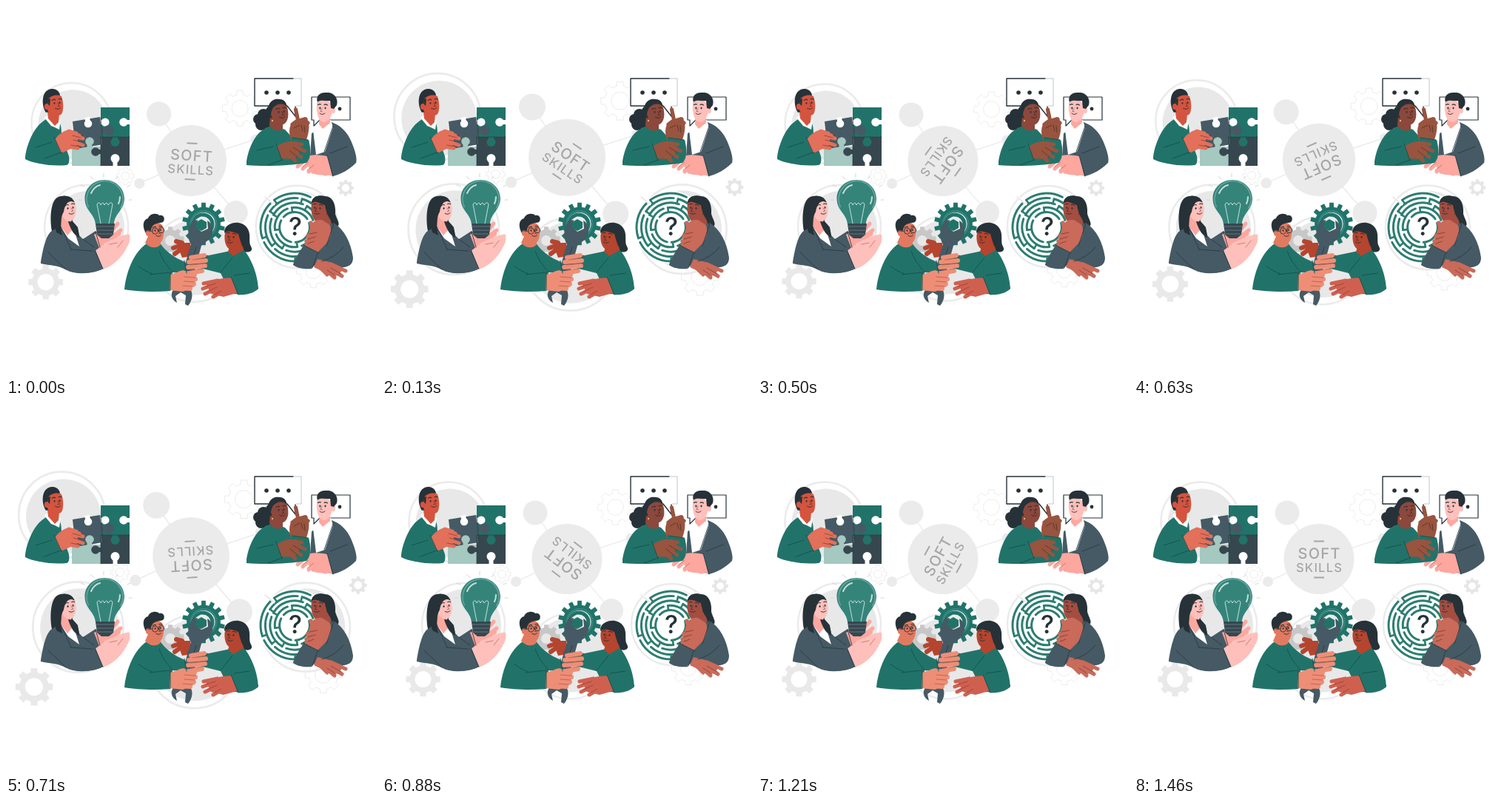
These frames come from a looping animation (500 px wide and 500 px high, 1.5 s). An HTML page with a canvas:

```html
<!DOCTYPE html>
<html lang="en">
<head>
<meta charset="utf-8">
<title>Soft skills</title>
<style>
html, body { margin: 0; width: 100%; height: 100%; overflow: hidden; background: #fff; }
canvas { display: block; width: 500px; height: 500px; }
</style>
</head>
<body>
<canvas id="stage" width="500" height="500"></canvas>
<script>
const ctx = document.getElementById('stage').getContext('2d');
const TAU = Math.PI * 2;
const GREEN = '#21736a', DEEP_GREEN = '#174f49', SLATE = '#455a64', DEEP_SLATE = '#37474f',
  INK = '#263238', MINT = '#a5c8c1', PALE = '#ebebeb';
const ROSE = '#ffc0bb', PINK = '#fda79f', RUST = '#d4543f', CORAL = '#e2705a', AMBER = '#e27a60',
  PEACH = '#ee8e77', BROWN = '#8c483c', UMBER = '#98543f', CLAY = '#b5452f', BRICK = '#cf6050',
  SIENNA = '#a44d41', SALMON = '#c96a5a';

function fill(color, d) {
  ctx.fillStyle = color;
  ctx.fill(new Path2D(d));
}
function line(color, width, d) {
  ctx.strokeStyle = color;
  ctx.lineWidth = width;
  ctx.stroke(new Path2D(d));
}
function disc(color, x, y, r, ry = r) {
  ctx.fillStyle = color;
  ctx.beginPath();
  ctx.ellipse(x, y, r, ry, 0, 0, TAU);
  ctx.fill();
}
function ring(color, width, x, y, r, from = 0, to = TAU) {
  ctx.strokeStyle = color;
  ctx.lineWidth = width;
  ctx.beginPath();
  ctx.arc(x, y, r, from, to);
  ctx.stroke();
}
function gear(x, y, r, teeth, hole, color, outlined) {
  const step = TAU / teeth, root = r * 0.79;
  ctx.beginPath();
  for (let i = 0; i < teeth; i++) {
    const a = i * step - Math.PI / 2;
    for (const [f, q] of [[-0.29, root], [-0.22, r], [0.22, r], [0.29, root]])
      ctx.lineTo(x + q * Math.cos(a + f * step), y + q * Math.sin(a + f * step));
  }
  ctx.closePath();
  ctx.moveTo(x + hole, y);
  ctx.arc(x, y, hole, 0, TAU);
  if (outlined) {
    ctx.strokeStyle = color;
    ctx.lineWidth = 0.9;
    ctx.stroke();
  } else {
    ctx.fillStyle = color;
    ctx.fill('evenodd');
  }
}
// Eyes, brows, nose and smile; dir is the side the head looks to.
function face(x, y, dir, tilt = 0) {
  ctx.save();
  ctx.translate(x, y);
  ctx.rotate(tilt);
  ctx.scale(dir, 1);
  disc(INK, -3.5, 0, 1, 1.4);
  disc(INK, 3.6, 0, 1, 1.4);
  line(INK, 1.1, 'M-6.5 -4Q-4 -6 -2 -4.5M2.5 -5Q4.5 -6 6.5 -4.5');
  line('#0007', 0.8, 'M1 0L3 4.5L0.5 4.8');
  line(INK, 0.9, 'M-3 7Q1 10 4 7');
  ctx.restore();
}

function backdrop() {
  line('#e4e4e4', 1, 'M250 209L207 147M250 209L181 240M250 209L310 279M250 209L336 181');
  for (const [x, y, r] of [[250, 209.5, 47.5], [207, 147, 16.5], [181, 240, 7], [310, 279, 16], [336, 181, 6.5]])
    disc(PALE, x, y, r);
  for (const [x, y, r, dx, dy] of [[90, 159, 53.5, 2, 2], [110, 298, 56, 2, 1], [254, 341, 57.5, 1, -2], [392, 298, 55, 1, 0]]) {
    disc('#fff', x, y, r);
    ring(PALE, 2.5, x, y, r);
    disc('#e8e8e8', x + dx, y + dy, r - 7);
  }
  gear(55.5, 372, 23.5, 8, 11, '#e9e9e9');
  gear(457, 246, 11, 8, 5, '#e6e6e6');
  gear(315.5, 139.5, 24, 8, 11, PALE, true);
  gear(162, 230, 12, 8, 5.5, PALE, true);
  gear(414, 357, 23, 8, 10.5, PALE, true);
}

function title(angle) {
  ctx.save();
  ctx.translate(250, 210);
  ctx.rotate(angle);
  ctx.fillStyle = '#a6a6a6';
  ctx.textAlign = 'center';
  ctx.letterSpacing = '1.2px';
  ctx.font = '500 20px Inter, sans-serif';
  ctx.fillText('SOFT', 0.5, -1);
  ctx.font = '500 16.5px Inter, sans-serif';
  ctx.fillText('SKILLS', 0.5, 17);
  ctx.fillRect(-7, -25.5, 14, 2);
  ctx.fillRect(-7, 23.5, 14, 2);
  ctx.restore();
}

function puzzle() {
  fill(MINT, 'M89 190H128V216H89Z');
  fill(GREEN, 'M128 137H167V177H128Z');
  fill(DEEP_SLATE, 'M128 177H167V216H128Z');
  disc(GREEN, 147.5, 184, 6);
  fill(GREEN, 'M144 176H151V182H144Z');
  disc('#fff', 134, 157, 5.5);
  fill('#fff', 'M127 154H133V160H127Z');
  disc('#fff', 159, 157, 5.8);
  fill('#fff', 'M160 154H168V160H160Z');
  disc('#fff', 147.5, 206, 6);
  fill('#fff', 'M144.5 207H150.5V217H144.5Z');
  disc(DEEP_SLATE, 121, 197, 5.8);
  fill(DEEP_SLATE, 'M121 194H129V200H121Z');
  fill(SLATE, 'M90 156L127 150L131 187L94 193Z');
  disc(SLATE, 139, 168, 7);
  fill(SLATE, 'M127 165L138 164V172H128Z');
  disc('#fff', 111, 159, 5.3);
  fill('#fff', 'M106 151L113 150L114 157L108 158Z');
  disc(MINT, 113, 183, 5.8);
  fill(MINT, 'M109.5 184H116V194H109.5Z');
  line('#2a3a42', 0.7, 'M128 151L131 187M128 177H167M128 177V216');
}

function puzzleMan() {
  fill(GREEN, 'M26 207C26 194 34 174 41 165C45 159 51 155 57 151L72 157C76 163 74 172 76 178L85 203C86 210 85 214 82 215C62 217 37 213 26 207Z');
  fill('#fff', 'M52 151L57 147L69 156L74 153L72 167L66 164L61 162Z');
  fill(RUST, 'M55 134L72 144L71 157L66 162L57 152Z');
  fill(INK, 'M54 144C48 135 48 119 56 114C62 110 71 112 73 120L70 126L58 143Z');
  fill(RUST, 'M57 127C59 121 69 119 75 122C78 131 78 141 75 146C69 151 60 147 56 141Z');
  disc(RUST, 55, 136, 3.2, 4);
  fill(INK, 'M57 126L60 125L59 135L57 133Z');
  face(69, 131, 1, -0.08);
  fill(CORAL, 'M65 181C72 173 78 168 86 167L97 170L97 188L77 198L70 196Z');
  line(CORAL, 5, 'M85 169L99 175M88 175L104 179M86 182L104 188M84 190L97 192');
  line('#8e3e31', 0.8, 'M90 175L101 178M91 181L103 184M88 188L99 190');
  fill(GREEN, 'M37 187L65 178L74 198L49 206Z');
  line(DEEP_GREEN, 0.9, 'M65 177L75 199M74 198L52 206M40 191L62 184');
}

function bubbles() {
  fill('#fff', 'M336 98H399V135H392L391 149L380 135H336Z');
  line(INK, 1.4, 'M388 98H336V135H380L391 149V136');
  line('#9aa3a7', 0.6, 'M388 98H399V135H392');
  const small = 'M413 123H465V154H424L416 162V154H413Z';
  fill('#fff', small);
  line(INK, 1.2, small);
  for (const x of [352, 367, 382]) disc(INK, x, 117, 2.8);
  for (const x of [437, 451]) disc(INK, x, 139, 2.4);
}

function talkers() {
  fill(SLATE, 'M413 172L440 157C451 161 461 169 467 184C472 196 475 207 473 212C463 222 453 227 441 230L428 208L411 203Z');
  fill('#fff', 'M415 168L422 158L439 154L442 164L431 197L419 201Z');
  fill(PINK, 'M424 147L438 144L438 158L428 166L423 160Z');
  fill(ROSE, 'M420 131C424 124 440 126 441 138C441 150 436 157 429 157C421 155 419 143 420 131Z');
  disc(ROSE, 442, 141, 3, 4);
  fill(INK, 'M421 130C418 122 424 116 433 117C442 116 450 124 447 134L443 139L439 138L438 128C432 129 425 126 421 130Z');
  face(428, 138, -1);
  fill(PINK, 'M440 204C424 201 411 199 403 206L413 226C425 230 434 227 442 230Z');
  line(PINK, 5, 'M407 206L394 217M412 210L401 220M419 214L409 224M421 224L432 227');
  line('#b95f58', 0.7, 'M409 211L400 218M416 215L407 222');
  fill(SLATE, 'M434 202L463 181L472 209C462 222 451 228 441 230Z');
  line('#2b3c45', 0.9, 'M434 202L442 230M438 199L461 190M442 162L430 197');

  for (const [x, y, r] of [[341, 153, 7], [348, 147, 8], [345, 160, 8], [353, 156, 9], [358, 142, 7]])
    disc(INK, x, y, r);
  fill(GREEN, 'M325 210C328 191 337 173 348 167L359 161L377 167L387 178L409 181C412 194 412 206 406 212C381 216 350 217 325 215Z');
  fill(BROWN, 'M357 148L374 155L374 167C367 171 359 167 356 161Z');
  fill(INK, 'M353 150C352 131 360 124 370 126C377 126 381 133 379 140L362 152Z');
  fill(BROWN, 'M360 139C365 131 376 130 380 137C383 147 381 157 375 160C366 161 358 153 358 145Z');
  disc('#d8b46a', 360, 155, 1.2);
  face(372, 143, 1, -0.1);
  fill(UMBER, 'M385 181C381 169 383 158 391 154L404 150C412 155 410 171 405 183Z');
  line(UMBER, 5.2, 'M395 156L391.5 140M400 154L405 153M404 160L408 158M387 160L394 155M388 165L398 159');
  line('#5b2d28', 0.8, 'M389 165L397 161M399 161L401 169M403 162L404 171');
  fill(GREEN, 'M386 178L409 181C413 198 411 208 405 212L384 212Z');
  fill(UMBER, 'M365 190C376 183 386 181 394 184L400 193L389 207L369 206Z');
  line(UMBER, 4.8, 'M389 185L400 187M390 190L404 196M386 197L399 204M381 200L391 209');
  line('#5b2d28', 0.7, 'M388 191L399 198M384 196L394 204');
  fill(GREEN, 'M337 192L365 186L372 207L352 215L333 213Z');
  line(DEEP_GREEN, 0.9, 'M365 186L373 209M339 195L361 190M373 208L354 215M387 178L408 181');
}

function bulb() {
  line('#d5d5d5', 1, 'M101 242L106 244M114 230L118 234M132 226V231M151 230L148 234M164 244L168 242M166 262H170M98 262H102');
  fill('#35847a', 'M106.5 261C106 246 118 235 133 235C148 235 160 246 160 261C159 277 146 281 146 295H121C120 281 107 277 106.5 261Z');
  ring('#6eaaa1', 1.3, 133.5, 261, 24.5, 2.7, 6.8);
  line('#c5dfda', 1, 'M128 294L123 268Q126 263 128 269Q131 263 133 269Q136 263 138 269Q142 263 144 268L139 294');
  line('#c5dfda', 2, 'M115 253Q119 244 127 242M154 258Q154 263 152 267');
}

function bulbWoman() {
  fill(INK, 'M62 304C59 288 60 265 69 259C78 254 90 257 91 264L90 291L97 299L99 314L73 310Z');
  fill(SLATE, 'M47 346C50 328 54 309 62 304L75 296L92 303L104 315L121 304C129 312 130 325 124 329L131 355C118 362 96 363 82 357C70 350 60 351 47 348Z');
  fill('#fff', 'M73 297L92 302L99 325L84 314Z');
  fill(PINK, 'M75 282L88 289L89 303L83 310L74 298Z');
  fill(ROSE, 'M74 270C78 260 91 260 94 269C96 280 93 289 87 291C79 291 73 283 74 270Z');
  fill(INK, 'M68 306C64 285 66 261 77 257C85 256 91 260 93 266C86 261 80 266 78 278C74 285 73 295 76 310Z');
  fill(INK, 'M84 291C92 290 99 299 99 313C91 309 87 301 84 291Z');
  face(87, 273, 1, -0.15);
  fill(PINK, 'M119 309L132 301L146 309L156 301L154 314L139 321L126 327Z');
  line(PINK, 5, 'M138 310L151 294M147 309L155 303');
  fill(DEEP_SLATE, 'M121 294H147L145 309L139 314H129L123 309Z');
  line('#607780', 1, 'M122 298H146M123 303H145M124 308H144');
  fill(ROSE, 'M120 331L138 318C148 314 155 311 162 309C168 309 169 316 165 323C158 338 147 350 131 356Z');
  line(ROSE, 5, 'M145 324L153 313M152 326L165 311M135 322L150 317');
  line('#b95f58', 0.7, 'M140 322L150 320M151 326L158 317');
  fill(SLATE, 'M85 327L121 330L131 355C118 362 96 363 84 358Z');
  line('#2b3c45', 0.9, 'M120 330L131 355M87 329L117 331M121 305L127 326M104 315L119 326M74 298L88 329M57 333L81 356');
}

function wrenchTeam() {
  gear(222, 317, 19, 9, 7, '#c7c7c7');
  gear(267, 294.5, 29, 14, 18, GREEN);
  ring('#2f8479', 3, 267, 294.5, 17);
  disc(PALE, 266, 295, 15.5);
  ring(GREEN, 5, 266, 295, 13);

  // Woman, behind the tool
  fill(INK, 'M295 304C297 292 318 288 326 300C332 309 327 318 331 325C335 331 328 334 322 332L303 326Z');
  line(CLAY, 6, 'M236 329L228 335M235 324L226 327M238 320L230 318');
  fill(CLAY, 'M230 320L249 320L252 338L238 340Z');
  fill(GREEN, 'M245 334L274 337L298 332L319 327C331 339 340 362 341 382C335 388 318 390 304 389L290 361L270 356L247 350Z');
  fill(CLAY, 'M303 322L320 318L321 330L307 338L300 332Z');
  fill(CLAY, 'M296 306C301 299 317 300 318 312C318 324 312 330 305 330C297 328 294 317 296 306Z');
  fill(INK, 'M295 307C297 294 311 291 319 299C326 306 325 324 325 331C318 326 317 318 314 308C308 306 301 302 295 307Z');
  face(304, 312, -1, 0.1);
  fill(BRICK, 'M306 367C291 368 280 369 270 375L277 389L294 393L315 387Z');
  line(BRICK, 5, 'M286 371L267 375M282 376L266 382M284 382L269 389M292 386L280 393');
  line('#8e3e31', 0.7, 'M283 375L270 379M285 380L272 386M291 385L282 390');
  fill(GREEN, 'M304 366L333 355L341 382C334 389 322 391 313 390Z');
  line(DEEP_GREEN, 0.9, 'M304 366L314 390M308 364L329 361M290 360L306 340M271 338L269 355');

  // Tool
  fill(SLATE, 'M250 294C251 289 256 287 259 289L257 298L264 305L273 301L272 290C279 293 281 305 277 312C273 318 267 320 264 324L248 382C253 386 253 397 246 405L242 403L243 391L236 387L229 392L231 401C222 396 221 386 230 380L234 376L250 322C244 313 246 301 250 294Z');
  fill(GREEN, 'M264 288L271 292V300L264 304L257 300V292Z');
  line(PALE, 1.2, 'M257 289L264 285L272 290');
  line('#2f424b', 1, 'M257 326L241 380');

  // Man, in front
  fill(GREEN, 'M160 383C163 356 174 332 190 321L207 319C215 331 227 340 242 346L245 361L225 360L222 385C201 387 177 386 160 383Z');
  fill(AMBER, 'M193 309L209 315L209 322C204 329 194 327 188 320Z');
  fill(AMBER, 'M191 297C197 290 211 290 213 301C214 313 211 320 205 322C195 320 189 311 191 297Z');
  fill(INK, 'M190 309C184 299 184 289 192 287C194 280 204 279 207 283C213 281 216 288 212 292C206 294 200 293 197 299L194 308Z');
  disc(AMBER, 192, 307, 3, 4);
  face(205, 303, 1, -0.1);
  ring(INK, 0.9, 201.5, 304, 4);
  ring(INK, 0.9, 210, 303, 3.7);
  line(INK, 0.8, 'M191 304L198 304');
  fill(PEACH, 'M222 363L239 357L257 362L255 379L239 386L221 384Z');
  line(PEACH, 6, 'M236 361L255 363M238 368L256 369M237 374L254 376M235 381L249 382');
  line('#b75e49', 0.8, 'M241 366L256 367M241 372L255 373M239 378L252 379');
  line(PEACH, 6, 'M250 340L268 337M247 346L270 344M246 353L269 351M247 361L265 358');
  line('#b75e49', 0.8, 'M252 343L268 341M250 350L268 348M250 357L266 355');
  line(DEEP_GREEN, 0.9, 'M222 360L222 384M194 363L221 360M178 351Q188 359 198 362M207 331Q213 348 225 359M241 344L244 361');
}

function maze() {
  const x = 390, y = 299, gap = 6.4;
  disc('#fff', x, y, 49);
  for (let i = 0; i < 5; i++) {
    const r = 46 - i * gap, arcs = 5 - (i >> 1), span = TAU / arcs;
    for (let k = 0; k < arcs; k++) {
      const a = k * span + i * 0.9 + 0.3, c = Math.cos(a), s = Math.sin(a);
      ring('#2d7d72', 3, x, y, r, a, a + span - 6 / r);
      if (i < 4) line('#2d7d72', 2.6, `M${x + r * c} ${y + r * s}L${x + (r - gap) * c} ${y + (r - gap) * s}`);
    }
  }
  line('#fff', 3, 'M351 258L362 268');
  line('#d0d0d0', 1, 'M350 258L361 267');
  disc('#fff', x + 1, y, 16);
  ctx.fillStyle = INK;
  ctx.textAlign = 'center';
  ctx.letterSpacing = '0px';
  ctx.font = '500 34px Inter, sans-serif';
  ctx.fillText('?', x + 1, 310);
}

function mazeWoman() {
  fill(INK, 'M414 268C411 259 421 254 431 257C442 257 446 269 445 281C447 288 451 293 449 297L425 298L432 284Z');
  fill(SLATE, 'M388 350C394 332 412 310 426 300L443 293C457 302 466 319 469 340C469 352 459 355 445 352L427 345L410 355C400 355 392 353 388 350Z');
  fill(SIENNA, 'M422 284L436 281L440 294L428 301L420 296Z');
  fill(SIENNA, 'M413 267C419 260 433 263 434 275C434 287 429 293 422 293C414 290 411 278 413 267Z');
  fill(INK, 'M413 266C413 257 426 254 434 259C442 264 440 276 446 292C437 291 433 281 431 269C424 267 418 262 413 266Z');
  face(421, 273, -1, 0.1);
  fill(SALMON, 'M411 300C413 291 420 288 427 289L438 296C441 306 438 315 433 321L420 334L403 324Z');
  line(SALMON, 5.5, 'M415 302L412 293M419 308L408 311M418 314L406 318M416 321L406 325');
  line('#7b3a30', 0.8, 'M420 306L410 308M418 312L408 315M416 318L408 321');
  fill(SLATE, 'M402 323L422 333L413 355C402 356 392 354 388 349Z');
  fill(SALMON, 'M421 342L441 347L456 354L449 365L431 360L416 353Z');
  line(SALMON, 5, 'M439 349L459 358M436 354L454 365M430 355L444 367M425 354L434 363');
  line('#7b3a30', 0.7, 'M439 354L453 362M434 357L446 365');
  line('#2b3c45', 0.9, 'M402 323L423 334M421 334L414 354M427 345Q444 340 456 326M443 294L433 324');
}

const PULSE = [[0, 1], [0.1, 1.1], [0.3, 1], [0.4, 1], [0.5, 1.1], [0.6, 1], [1.01, 1]];
function pulse(p) {
  const i = PULSE.findIndex(([at]) => at > p);
  const [a, from] = PULSE[i - 1], [b, to] = PULSE[i];
  return from + (to - from) * (p - a) / (b - a);
}

// The motion advances in 36 steps per loop, as on a 24 fps shutter.
function draw() {
  const step = Math.floor((performance.now() % 1500 + 5) / (1500 / 36)) % 36;
  const progress = (14 + step * 42.45) / 1500;
  const scale = pulse(Math.min(progress, 1));
  ctx.fillStyle = '#fff';
  ctx.fillRect(0, 0, 500, 500);
  ctx.lineCap = ctx.lineJoin = 'round';
  ctx.save();
  ctx.translate(249.5, 259);
  ctx.scale(scale, scale);
  ctx.translate(-249.5, -259);
  backdrop();
  ctx.restore();
  title(progress * TAU);
  for (const part of [puzzle, puzzleMan, bubbles, talkers, bulb, bulbWoman, wrenchTeam, maze, mazeWoman]) part();
  requestAnimationFrame(draw);
}
draw();
</script>
</body>
</html>
```
